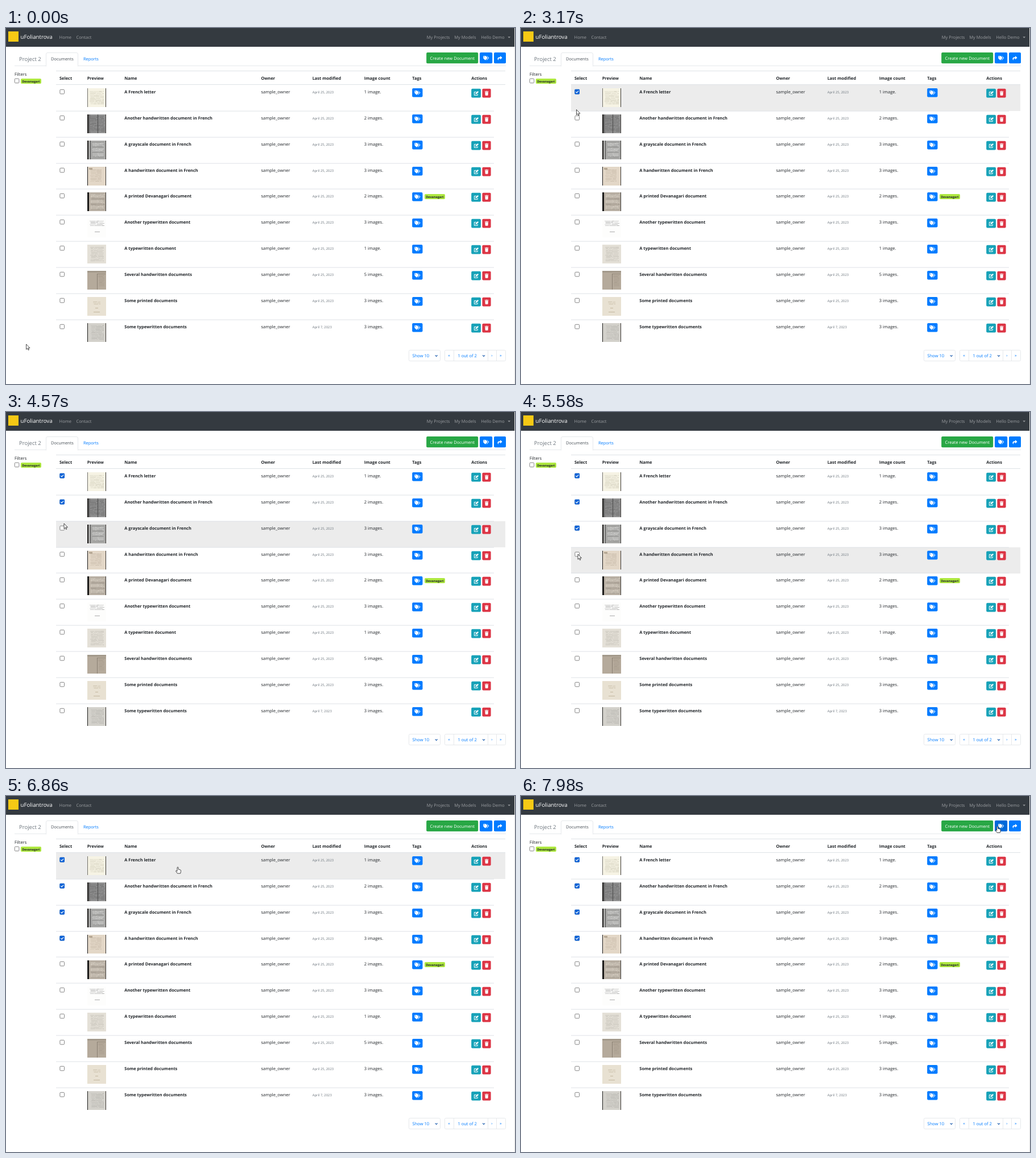
Recreate the animation shown at these times as an HTML page. Size 895x626 px, loop 8000 ms.

```html
<!DOCTYPE html>
<html lang="en">
<head>
<meta charset="utf-8">
<title>Document list</title>
<style>
  html, body { margin: 0; width: 100%; height: 100%; overflow: hidden; background: #fff; }
  svg { display: block; }
  text { font-family: "Open Sans", "Noto Sans", sans-serif; text-rendering: geometricPrecision; white-space: pre; }
</style>
</head>
<body>
<svg id="stage" width="895" height="626" viewBox="0 0 895 626"></svg>
<script>
const BLUE = '#007bff', GREEN = '#28a745', TEAL = '#17a2b8', RED = '#dc3545';
const INK = '#212529', MUTED = '#6c757d', LINE = '#dee2e6', SOFT_LINE = '#e6e9ec', NAV = '#9a9da0';
const PITCH = 45.87, LOOP = 8000;
const rowOffset = i => Math.round(PITCH * i);

// Drawing helpers
const rect = (x, y, w, h, fill, extra = '') =>
  `<rect x="${x}" y="${y}" width="${w}" height="${h}" fill="${fill}" ${extra}/>`;
const box = (x, y, w, h) =>
  rect(x + .5, y + .5, w - 1, h - 1, '#fff', `rx="2" stroke="${SOFT_LINE}"`);
const button = (x, y, w, h, fill, id = '') => rect(x, y, w, h, fill, `rx="2" ${id && `id="${id}"`}`);
const text = (s, x, y, fill = INK, size = 7.55, extra = '') =>
  `<text x="${x}" y="${y}" fill="${fill}" font-size="${size}" ${extra}>${s}</text>`;
const bold = (s, x, y, size = 7.42) => text(s, x, y, INK, size, 'font-weight="700"');
const path = (d, x, y, scale = 1, extra = 'fill="#fff"') =>
  `<path transform="translate(${x} ${y}) scale(${scale})" d="${d}" ${extra}/>`;

const ICON = 8 / 512;
const tagsIcon = (x, y) => path('M0 252V48C0 21 21 0 48 0h204c13 0 25 5 34 14l176 176c19 19 19 49 0 68L258 462c-19 19-49 19-68 0L14 286C5 277 0 265 0 252zM112 64a48 48 0 1 0 0 96 48 48 0 0 0 0-96zM626 258L422 462c-19 19-49 19-68 0L528 288c36-36 36-94 0-130L370 0h27c13 0 25 5 34 14l192 176c19 19 19 49 3 68z',
  x, y, ICON, 'fill="#fff" fill-rule="evenodd"');
const shareIcon = (x, y) => path('M504 190L328 38C312 24 288 35 288 56v80C127 138 0 170 0 322c0 62 40 122 83 154 14 10 33-2 28-18C66 313 133 274 288 272v88c0 21 24 31 40 18l176-152c11-10 11-27 0-36z', x, y, ICON);
const trashIcon = (x, y) => path('M16 32h130l30-32h96l30 32h130v64H16zM48 128h352l-21 340q-3 44-48 44H117q-45 0-48-44z', x, y, ICON);
const editIcon = (x, y) =>
  path('M4.8 1.7H.8V7.5H6.6V5', x, y, 1, 'fill="none" stroke="#fff"') +
  path('M2.7 5.7 3 4 6.9.1 8.4 1.6 4.5 5.5z', x, y);
const chevron = (x, y) => path('M-2-1 0 1 2-1', x, y, 1, 'fill="none" stroke="#1f5fae" stroke-width="1.2"');
const checkbox = (x, y) =>
  rect(x + .5, y + .5, 7.6, 7.6, '#fff', 'rx="1.3" stroke="#767676" stroke-width=".9"');
const badge = (x, y) => button(x, y, 36, 9, '#aee840') + bold('Devanagari', x + 2.2, y + 6.7, 5.55);

function randomizer(seed) {
  return () => (seed = (seed * 16807) % 2147483647) / 2147483647;
}

// Thumbnails: paper and ink tones, dark edge widths, text block x, y, width, height, larger shapes
const bands = (fill, x, w, ...tops) => tops.map(y => rect(x, y, w, 6, fill)).join('');
const thumbs = [
  ['#f6f3e4', '#b9b59f', .6, 1, 4, 5, 25, 24, ''],
  ['#919191', '#565656', 2, 1, 5, 3, 26, 28, rect(18, 0, 1, 33, '#4a4a4a') + rect(2, 0, 3, 33, '#6f6f6f')],
  ['#a9a9a7', '#828280', 2, 1, 8, 3, 22, 28, rect(5, 0, 1, 33, '#4a4a4a') + bands('#c9c9c7', 9, 20, 4, 13, 22)],
  ['#e3d7c7', '#b9aa98', 1, 1, 5, 5, 20, 22, rect(3, 2, 6, 3, '#b5a793')],
  ['#b9b0a4', '#8f877c', 3, 1, 6, 3, 25, 28, bands('#d2cabe', 6, 24, 3, 13, 23)],
  ['#fdfdfc', '#8d8d8d', 0, 0, 4, 4, 26, 9, rect(13, 23, 9, 1, '#aaa')],
  ['#e4e0d7', '#b5b1a8', 0, 0, 5, 4, 24, 26, ''],
  ['#b5aa9b', '#9d9182', 0, 0, 19, 8, 11, 20, rect(0, 0, 33, 3, '#a3998b') + rect(17, 5, .8, 28, '#80766a') + rect(17, 5, 15, .8, '#8d8273')],
  ['#e8e1d2', '#c2b69e', 0, 0, 10, 8, 13, 6, rect(14, 19, 5, 1, '#c2b69e') + rect(11, 26, 11, 1, '#c2b69e')],
  ['#d3d1cb', '#aaa8a2', 1, 1, 6, 4, 23, 26, '']
];
function thumbnail([paper, ink, left, right, bx, by, bw, bh, shapes], index) {
  const rand = randomizer(4001 + index * 977);
  let out = rect(0, 0, 33, 33, paper) + shapes;
  for (let y = by; y < by + bh; y += 2)
    for (let x = bx + rand() * 2; x < bx + bw - 2;) {
      const w = Math.min(4 + rand() * 8, bx + bw - x);
      out += rect(x.toFixed(1), y, w.toFixed(1), .8, ink, `opacity="${(.35 + rand() * .5).toFixed(2)}"`);
      x += w + .5 + rand();
    }
  return `<g transform="translate(143 106)">${out}` +
    rect(0, 0, left, 33, '#1b1a19') + rect(33 - right, 0, right, 33, '#3b3835') + '</g>';
}

const documents = [
  ['A French letter', 1], ['Another handwritten document in French', 2],
  ['A grayscale document in French', 3], ['A handwritten document in French', 3],
  ['A printed Devanagari document', 2], ['Another typewritten document', 3],
  ['A typewritten document', 1], ['Several handwritten documents', 5],
  ['Some printed documents', 3], ['Some typewritten documents', 3]
];
function documentRow([name, count], i) {
  const date = i === 9 ? 'April 7, 2023' : 'April 25, 2023';
  return `<g transform="translate(0 ${rowOffset(i)})">` +
    (i ? rect(88, 99.6, 770, 1, LINE) : '') +
    checkbox(94.4, 107.8) +
    `<g class="tick" visibility="hidden">${rect(94.4, 107.8, 8.6, 8.6, '#0b62d6', 'rx="1.3"')}` +
    path('M1.8 4.4 3.6 6.2 6.9 2.5', 94.4, 107.8, 1, 'fill="none" stroke="#fff" stroke-width="1.2"') + '</g>' +
    thumbnail(thumbs[i], i) +
    bold(name, 208.3, 115) + text('sample_owner', 448.4, 115) +
    text(date, 538.7, 115, MUTED, 5.9) +
    text(`${count} image${count > 1 ? 's' : ''}.`, 629.8, 115) +
    button(714.2, 106, 18.3, 15.6, BLUE) + tagsIcon(718.4, 110.1) +
    (i === 4 ? badge(736, 109) : '') +
    button(818.2, 106.8, 16.8, 15.6, TEAL) + editIcon(822.6, 110.8) +
    button(837.4, 106.8, 15.2, 15.6, RED) + trashIcon(841.6, 110.7) + '</g>';
}

const columns = { Select: 94, Preview: 142.7, Name: 208.3, Owner: 448.4, 'Last modified': 538.7,
  'Image count': 629.8, Tags: 714.3, Actions: 818.3 };

const stage = document.getElementById('stage');
stage.innerHTML =
  // Navigation bar
  rect(0, 0, 895, 33, '#343a40') + rect(4, 6, 18, 18, '#f6c915') +
  text('uFoliantrova', 25.5, 19.2, '#fff', 9.7) +
  text('Home', 93.6, 19.2, NAV) + text('Contact', 123.4, 19.2, NAV) +
  text('My Projects', 739.8, 19.2, NAV) + text('My Models', 788.2, 19.2, NAV) +
  text('Hello Demo', 835.2, 19.2, NAV) + path('M0 0H4.6L2.3 2.4z', 882.4, 15.3, 1, `fill="${NAV}"`) +
  rect(894, 0, 1, 626, '#e6e6e6') +
  // Tabs and main buttons
  rect(15, 66, 864, 1, SOFT_LINE) +
  path('M0 24V2.5Q0 0 2.5 0H53.5Q56 0 56 2.5V24', 70.5, 43.5, 1, `fill="#fff" stroke="${SOFT_LINE}"`) +
  text('Project 2', 23, 58.2, MUTED, 9.5) +
  text('Documents', 79, 57, '#495057', 7.45) + text('Reports', 135.9, 57, BLUE, 7.45) +
  button(739.2, 43, 91, 19.2, GREEN) +
  text('Create new Document', 784.8, 55.8, '#fff', 7.55, 'text-anchor="middle"') +
  button(833, 43, 22.2, 19.2, BLUE, 'tagButton') + tagsIcon(839.2, 49) +
  button(858, 43, 21, 19.2, BLUE) + shareIcon(864.4, 49) +
  // Filters
  text('Filters', 15, 84.2) + checkbox(14.8, 88.6) + badge(26, 89) +
  // Table
  rect(88, 76, 790, 24, '#ececec', 'id="hover"') +
  rect(88, 75, 790, 1, LINE) + rect(88, 99, 790, 1, LINE) +
  Object.entries(columns).map(([label, x]) => bold(label, x, 90.7)).join('') +
  documents.map(documentRow).join('') +
  // Pagination
  box(708, 566, 56, 20) + text('Show 10', 714.5, 578.8, BLUE) + chevron(756.7, 576.3) +
  box(771, 566, 108, 20) + [787, 847, 862].map(x => rect(x, 566, 1, 20, SOFT_LINE)).join('') +
  text('1 out of 2', 794.4, 578.8, BLUE) + chevron(840, 576.3) +
  text('«', 777.3, 578.4, BLUE, 7) + text('›', 853.2, 578.4, BLUE, 7) + text('»', 868, 578.4, BLUE, 7) +
  // Pointers
  `<g id="pointer" stroke="#111" stroke-width=".75" stroke-linejoin="round" fill="#fff">
    <path id="arrow" d="M0 0V9.2L2.1 7.2 3.5 10.4 4.9 9.8 3.6 6.7H6.4Z"/>
    <path id="hand" d="M-1 1Q0-.5 1 1V4.3L4.8 5.3Q5.8 5.8 5.5 8L4.7 11.5H-.6L-3.2 7.9Q-3.5 6.4-2 6.8L-1 7.8Z"/>
  </g>`;

// Pointer positions, each held until the next: time, x, y
const route = [
  [0, 35.6, 556], [840, 38, 545], [990, 48, 512], [1140, 62, 480], [1300, 75.4, 456.4],
  [1580, 81, 425.5], [1730, 85, 350], [1870, 86, 265], [2020, 86, 200], [2150, 86, 167],
  [2450, 90, 138], [2600, 95, 120], [2750, 97, 113],
  [3170, 97.5, 143.5], [3320, 98, 153], [3470, 98, 157],
  [4140, 99, 160], [4290, 100, 172], [4430, 101.5, 186], [4570, 102, 196],
  [4690, 102, 201], [4840, 101.5, 204], [4990, 101, 206],
  [5430, 100.5, 234], [5580, 100, 250],
  [6710, 170, 205], [6860, 302, 124.6], [7010, 480, 112], [7130, 620, 96],
  [7410, 720, 72], [7560, 778, 66], [7700, 820, 64], [7830, 834, 57], [7980, 837.7, 53]
];
const checkTimes = [3030, 4000, 5140, 6010];

const byId = id => document.getElementById(id);
const hover = byId('hover'), pointer = byId('pointer'), tagButton = byId('tagButton');
const ticks = [...document.querySelectorAll('.tick')];
const show = (el, on) => el.setAttribute('visibility', on ? 'visible' : 'hidden');

function draw(time) {
  const [, x, y] = route.findLast(stop => stop[0] <= time);
  pointer.setAttribute('transform', `translate(${x} ${y})`);

  const inTable = x >= 88 && x < 878 && y >= 76;
  const row = y < 100 ? -1 : Math.floor((y - 100) / PITCH);
  show(hover, inTable && row < documents.length);
  hover.setAttribute('y', row < 0 ? 76 : 100 + rowOffset(row));
  hover.setAttribute('height', row < 0 ? 24 : 46);

  ticks.forEach((tick, i) => {
    const top = 107.8 + rowOffset(i);
    const over = x >= 94 && x <= 103 && y >= top && y <= top + 9;
    show(tick, time >= checkTimes[i]);
    tick.firstChild.setAttribute('fill', over ? '#3a83ea' : '#0b62d6');
  });

  const overTags = x >= 833 && x <= 855 && y >= 43 && y <= 62;
  tagButton.setAttribute('fill', overTags ? '#0069d9' : BLUE);
  const isHand = overTags || (inTable && row >= 0 && x > 130);
  show(byId('hand'), isHand);
  show(byId('arrow'), !isHand);
}

const start = performance.now();
function tick(now) {
  draw(Math.max(0, now - start) % LOOP);
  requestAnimationFrame(tick);
}
draw(0);
requestAnimationFrame(tick);
</script>
</body>
</html>
```
